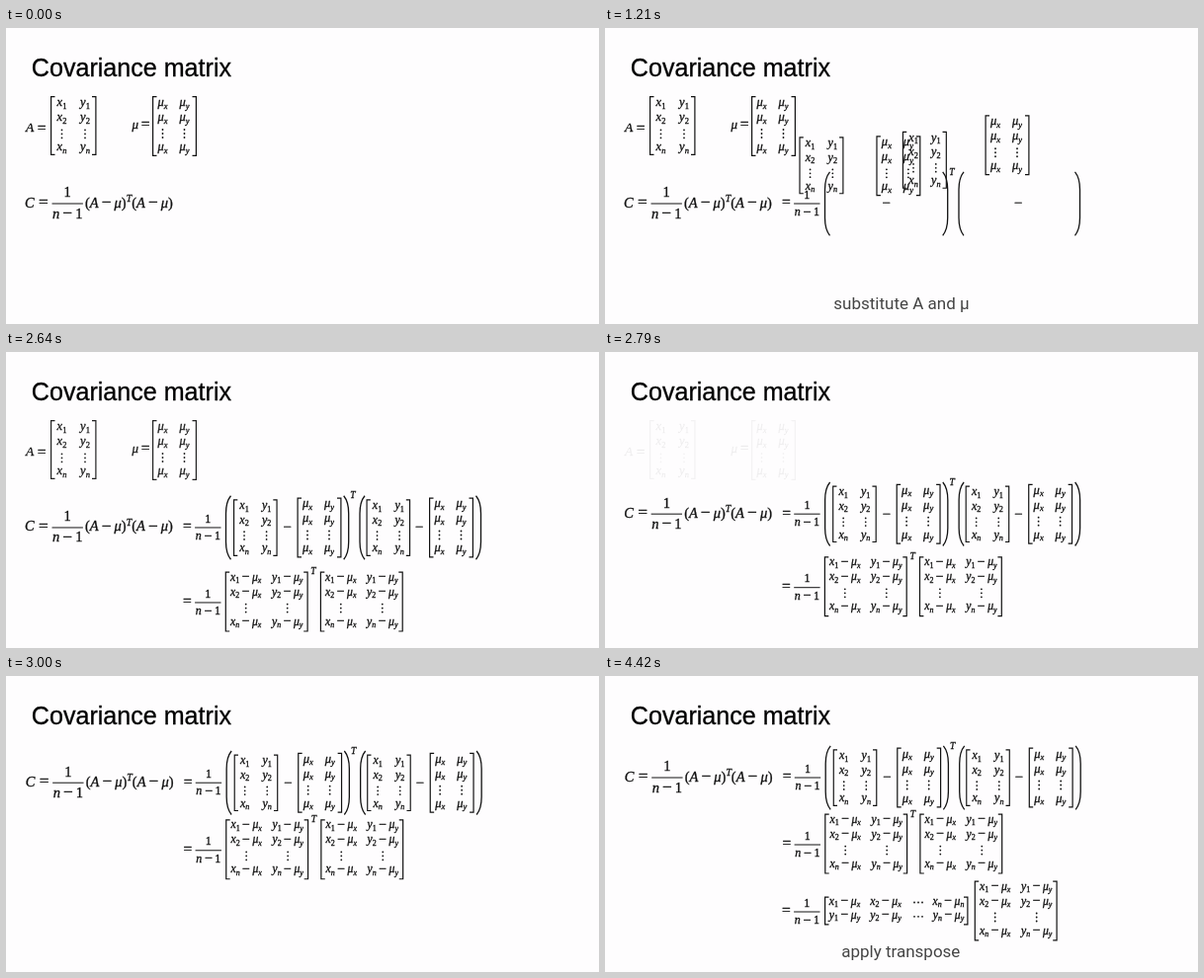
These frames come from a looping animation (600 by 300 pixels, 5.86 s). An HTML page with a canvas:

```html
<!DOCTYPE html>
<html lang="en">
<head>
<meta charset="utf-8">
<title>Covariance matrix</title>
<style>
  html, body { margin: 0; width: 100%; height: 100%; overflow: hidden; background: #fefdfe; }
  canvas { display: block; }
</style>
</head>
<body>
<canvas id="stage" width="600" height="300"></canvas>
<script>
const ctx = document.getElementById('stage').getContext('2d');
const LOOP = 5860;
const INK = '#111';
const SERIF = '"Liberation Serif", "Times New Roman", serif';
const SANS = '"Liberation Sans", Arial, sans-serif';
const CAPTION = 'Roboto, sans-serif';

const clamp = v => Math.max(0, Math.min(1, v));
const mix = (a, b, u) => a + (b - a) * u;
const span = (t, from, to) => clamp((t - from) / (to - from));
const easeInOut = u => u < .5 ? Math.pow(2 * u, 2.5) / 2 : 1 - Math.pow(2 - 2 * u, 2.5) / 2;

// A thin outline gives the glyphs a little more weight.
function label(str, x, y, font, color = INK, weight = 0) {
  ctx.font = font;
  ctx.fillStyle = ctx.strokeStyle = color;
  ctx.fillText(str, x, y);
  if (!weight) return;
  ctx.lineWidth = weight;
  ctx.strokeText(str, x, y);
}

// Math text: letters italic, operators wide, "_" lowers and "^" raises the next character.
function math(str, x, y, size, centered) {
  const glyphs = [];
  let width = 0, shift = 0;
  for (const ch of str) {
    if (ch === '_' || ch === '^') { shift = ch === '_' ? .2 : -.38; continue; }
    const operator = /[−=]/.test(ch);
    const px = size * (shift ? .68 : operator ? 1.2 : 1);
    const font = (/[a-zμ]/i.test(ch) ? 'italic ' : '') + px + 'px ' + SERIF;
    const pad = operator ? size * .21 : 0;
    const drop = operator ? .05 : shift;
    ctx.font = font;
    glyphs.push([ch, width + pad, drop * size, font]);
    width += ctx.measureText(ch).width + 2 * pad;
    shift = 0;
  }
  const left = centered ? x - width / 2 : x;
  for (const [ch, dx, dy, font] of glyphs) label(ch, left + dx, y + dy, font, INK, .3);
}

function line(points, width = 1.2) {
  ctx.strokeStyle = INK;
  ctx.lineWidth = width;
  ctx.beginPath();
  points.forEach(([x, y]) => ctx.lineTo(x, y));
  ctx.stroke();
}

function dots(x, y, dx, dy) {
  ctx.fillStyle = INK;
  for (const i of [-1, 0, 1]) {
    ctx.beginPath();
    ctx.arc(x + i * dx, y + i * dy, .9, 0, 7);
    ctx.fill();
  }
}

function matrix({ rows, cols, w, h, size, first, pitch = 15 }, x, y, scale = 1) {
  ctx.save();
  ctx.translate(x, y);
  ctx.scale(scale, scale);
  line([[4.5, .6], [.6, .6], [.6, h - .6], [4.5, h - .6]]);
  line([[w - 4.5, .6], [w - .6, .6], [w - .6, h - .6], [w - 4.5, h - .6]]);
  rows.forEach((row, r) => row.forEach((cell, c) => {
    const base = first + pitch * r;
    if (cell === '⋮') dots(cols[c], base - 2, 0, 4);
    else if (cell === '…') dots(cols[c], base - 2, 4, 0);
    else math(cell, cols[c], base, size, true);
  }));
  ctx.restore();
}

const VDOTS = ['⋮', '⋮'];
const tall = (make, shape) => ({ rows: [make(1), make(2), VDOTS, make('n')], ...shape });
const dataM = tall(i => ['x_' + i, 'y_' + i],
  { cols: [11.5, 35], w: 46.5, h: 60, size: 12.5, first: 10.3 });
const meanM = tall(() => ['μ_x', 'μ_y'],
  { cols: [10.5, 32.5], w: 45, h: 61, size: 12.5, first: 10 });
const diffM = tall(i => [`x_${i}−μ_x`, `y_${i}−μ_y`],
  { cols: [21, 63], w: 84, h: 61, size: 11.7, first: 9 });
const flatM = {
  rows: [
    ['x_1−μ_x', 'x_2−μ_x', '…', 'x_n−μ_n'],
    ['y_1−μ_y', 'y_2−μ_y', '…', 'y_n−μ_y']
  ],
  cols: [20.5, 62, 95, 125.5], w: 145.5, h: 29, size: 11.7, first: 8, pitch: 14.3
};

function paren(x, dir) {
  const top = 145.8, bottom = 210.3, tip = x + 5 * dir;
  ctx.strokeStyle = INK;
  ctx.lineWidth = 1.3;
  ctx.beginPath();
  ctx.moveTo(tip, top);
  ctx.quadraticCurveTo(x, top + 6, x, top + 18);
  ctx.lineTo(x, bottom - 18);
  ctx.quadraticCurveTo(x, bottom - 6, tip, bottom);
  ctx.stroke();
}

function fraction(x, y, halfWidth, size) {
  math('1', x, y - size * .45, size, true);
  line([[x - halfWidth, y], [x + halfWidth, y]], 1);
  math('n−1', x, y + size, size, true);
}

// "= 1/(n − 1)" with the fraction bar at height y
function factor(y) {
  math('=', 176.3, y + 2.8, 13);
  fraction(204.3, y, 13.2, 12);
}

function definitions() {
  math('A', 20, 105, 13.5);
  math('=', 29, 105, 13);
  matrix(dataM, 45, 69);
  math('μ', 127.5, 101.5, 13);
  math('=', 134, 101.5, 13);
  matrix(meanM, 148, 69);
}

function formula() {
  math('C', 19, 181.5, 14.5);
  math('=', 30, 181.5, 14.5);
  fraction(62.2, 178, 15.7, 14.5);
  math('(A−μ)^T(A−μ)', 80, 181.5, 14.5);
}

function skeleton() {
  factor(178);
  for (const [x, dir] of [[222.5, 1], [346.7, -1], [358, 1], [480.5, -1]]) paren(x, dir);
  math('−', 284.5, 181.7, 12.5, true);
  math('−', 418, 181.7, 12.5, true);
  math('T', 351, 148.5, 9.5, true);
}

// Flying copies: start x, end x, end y, end scale, and the bend of the path in x and y
const copies = [
  [dataM, 45, 230, 149.3, .96, 1.1, 2.8],
  [meanM, 148, 294.5, 147.5, 1, 1.28, 2.8],
  [dataM, 45, 364.5, 149.3, .96, 1.04, 3.4],
  [meanM, 148, 428, 147.5, 1, 1.2, 5.9]
];

function fly(u) {
  for (const [m, x0, x1, y1, scale, bendX, bendY] of copies) {
    const x = mix(x0, x1, 1 - Math.pow(1 - u, bendX));
    const y = mix(69, y1, Math.pow(u, bendY));
    matrix(m, x, y, mix(1, scale, u));
  }
}

function expanded() {
  factor(254);
  matrix(diffM, 221.7, 222.6);
  math('T', 311, 225.5, 9.5, true);
  matrix(diffM, 317.8, 222.6);
}

function transposed() {
  factor(239);
  matrix(flatM, 222, 223.5);
  matrix(diffM, 373.7, 207.5);
}

function group(draw, { dx = 0, dy = 0, alpha = 1 } = {}) {
  if (alpha <= 0) return;
  ctx.save();
  ctx.globalAlpha = alpha;
  ctx.translate(dx, dy);
  draw();
  ctx.restore();
}

function caption(t) {
  const font = '17px ' + CAPTION, color = '#444';
  if (t >= 880 && t < 1760) label('substitute A and μ', 231.3, 285, font, color);
  if (t >= 1760 && t < 2640) {
    label('expand', 441.3, 285, font, color);
    label('.', 104, 285, '10px ' + SANS, color);
  }
  if (t >= 3510) label('apply transpose', 239.2, 285, font, color);
}

function render(t) {
  ctx.fillStyle = '#fefdfe';
  ctx.fillRect(0, 0, 600, 300);
  label('Covariance matrix', 25.8, 49.2, '25.1px ' + SANS, '#000', .3);

  const lift = easeInOut(span(t, 2630, 3110));
  const top = { dx: .7 * lift, dy: -75 * lift };
  group(definitions, { alpha: 1 - span(t, 2630, 2799) });
  group(formula, top);
  if (t >= 880) {
    group(skeleton, { ...top, alpha: span(t, 860, 1180) });
    group(() => fly(span(t, 880, 1300)), top);
  }
  if (t >= 1760) group(expanded, { dx: .5 * lift, dy: -83 * lift });
  group(transposed, { alpha: span(t, 3510, 4060) });
  caption(t);
}

const start = performance.now();
function tick() {
  render((performance.now() - start) % LOOP);
  requestAnimationFrame(tick);
}
tick();
</script>
</body>
</html>
```
